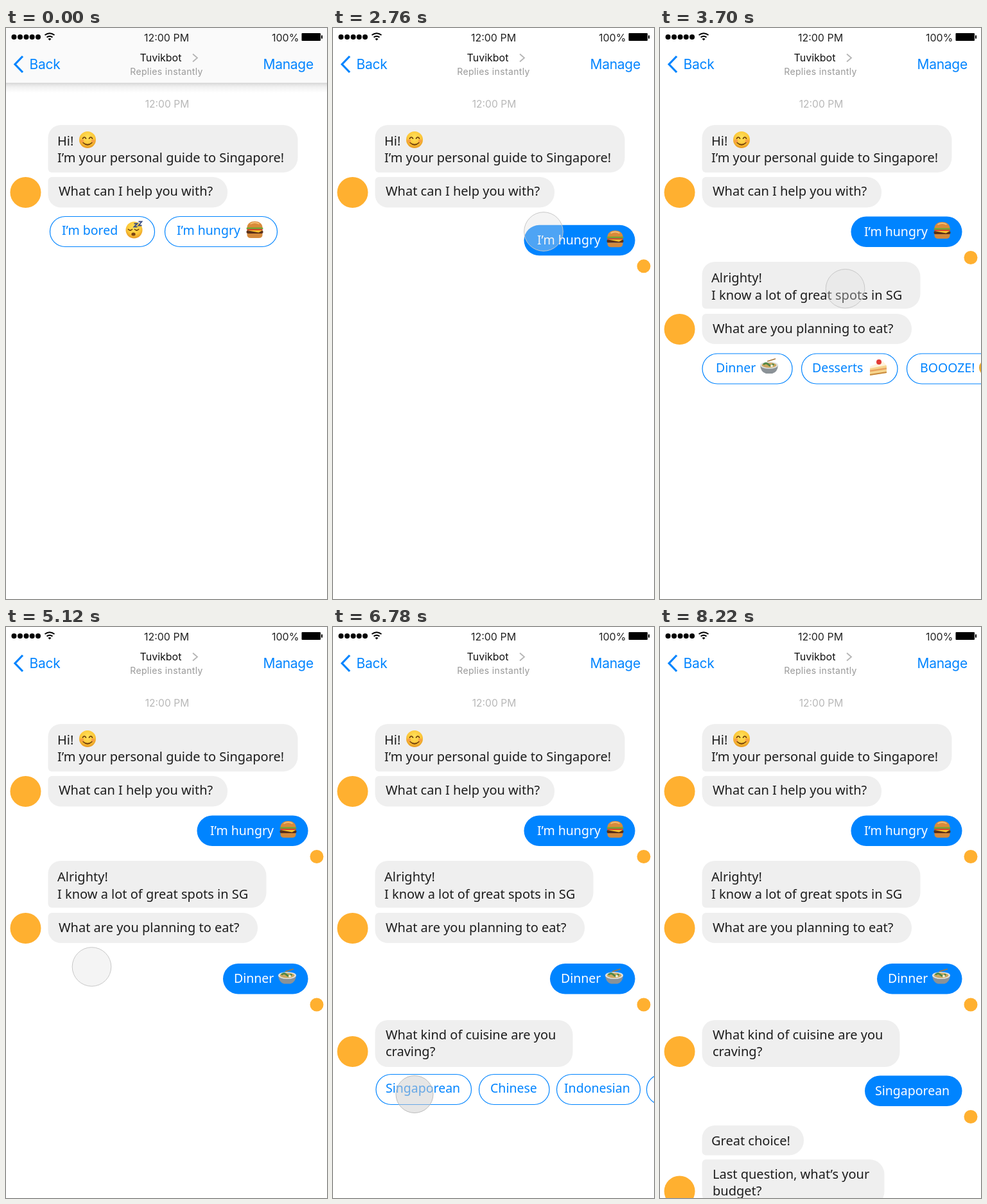
Write an HTML page that moves like this. It is 500x889 px and loops after 8.88 s.

```html
<!DOCTYPE html>
<html lang="en">
<head>
<meta charset="utf-8">
<title>Chat guide</title>
<style>
html, body { margin: 0; width: 100%; height: 100%; overflow: hidden; background: #fff; }
svg { display: block; width: 100%; height: 100%; }
text { font-family: "Noto Sans", sans-serif; font-size: 20px; fill: #1c1c1c; white-space: pre; }
.ui { font-family: Inter, sans-serif; }
.link { fill: #0084ff; font-size: 19.5px; }
.sent { fill: #fff; font-size: 19.5px; }
</style>
</head>
<body>
<svg id="stage" viewBox="0 0 500 889" xmlns="http://www.w3.org/2000/svg">
  <defs>
    <linearGradient id="shade" x1="0" y1="0" x2="0" y2="1">
      <stop offset="0" stop-color="#dcdcdc"/><stop offset=".4" stop-color="#f2f2f2"/><stop offset="1" stop-color="#fff"/>
    </linearGradient>
    <radialGradient id="face" cx=".5" cy=".35" r=".7">
      <stop offset="0" stop-color="#ffe25c"/><stop offset=".6" stop-color="#fcc738"/><stop offset="1" stop-color="#e08a1c"/>
    </radialGradient>
    <g id="smile">
      <circle r="13" fill="url(#face)"/>
      <g fill="none" stroke="#6b3b0c" stroke-width="1.7" stroke-linecap="round">
        <path d="M-7.5-2q2.5-4 5 0M2.5-2q2.5-4 5 0M-7 4.500q7 6.500 14 0"/>
      </g>
      <g fill="#f58a4a" opacity=".6"><circle cx="-8.500" cy="2" r="2.800"/><circle cx="8.500" cy="2" r="2.800"/></g>
    </g>
    <g id="sleepy">
      <circle r="13" fill="url(#face)"/>
      <path d="M-9-1q3 3 6 0M1-1q3 3 6 0" fill="none" stroke="#6b3b0c" stroke-width="1.700" stroke-linecap="round"/>
      <ellipse cx="-1" cy="6.500" rx="3.200" ry="2.500" fill="#7a4312"/>
      <path d="M0-10h5l-5 5h5M7-13h5l-5 6h5" fill="none" stroke="#3b4f86" stroke-width="1.800"/>
    </g>
    <g id="burger">
      <path d="M-12-3C-12-10-6-13 0-13S12-10 12-3z" fill="#d98a3a"/>
      <path d="M-7-9q7-4 14 0" fill="none" stroke="#f3bd74" stroke-width="2"/>
      <rect x="-13" y="-3.500" width="26" height="3" rx="1.500" fill="#6fa536"/>
      <rect x="-12" y="-1" width="24" height="2.500" fill="#d9432f"/>
      <rect x="-13" y="1" width="26" height="5" rx="2.500" fill="#5b3018"/>
      <path d="M-12 1h24l-6 3.500z" fill="#fbc02d"/>
      <path d="M-12 6h24v2q0 5-6 5h-12q-6 0-6-5z" fill="#d4893c"/>
    </g>
    <g id="soup">
      <path d="M-3-8L10-12" stroke="#a8773c" stroke-width="1.500"/>
      <path d="M-14-2q1 11 9 13h10q8-2 9-13z" fill="#8b9297"/>
      <ellipse cy="-2" rx="14" ry="5.500" fill="#dfe3e2"/>
      <ellipse cy="-2" rx="11.500" ry="4" fill="#cda760"/>
      <path d="M-9-3q4-4 8 0t8-1" fill="none" stroke="#4f8744" stroke-width="3"/>
      <circle cx="4" cy="-1" r="2" fill="#f5efd9"/>
    </g>
    <g id="cake">
      <path d="M-13-1L7-9l6 6v11l-26 4z" fill="#f6d58d"/>
      <path d="M-13-2L7-10l6 6-26 5z" fill="#fff3dc"/>
      <path d="M-13 5l26-4" stroke="#e9a15e" stroke-width="2.500"/>
      <path d="M-13 11l26-4" stroke="#c98a3d" stroke-width="2"/>
      <circle cx="1" cy="-9" r="4" fill="#e23b35"/>
    </g>
  </defs>
  <g id="chat"></g>
  <g id="header">
    <g id="bar">
      <rect width="500" height="86" fill="#fafafa"/>
      <rect y="86" width="500" height="15" fill="url(#shade)"/>
      <path d="M0 86h500" stroke="#cfcfcf"/>
    </g>
    <g><circle cx="12.500" cy="14" r="4"/><circle cx="22" cy="14" r="4"/><circle cx="31.500" cy="14" r="4"/><circle cx="40.700" cy="14" r="4"/><circle cx="50" cy="14" r="4"/></g>
    <path d="M60.500 11q7.500-5.500 15 0M63.500 14.500q4.500-3.500 9 0" fill="none" stroke="#000" stroke-width="2"/>
    <path d="M65.500 17q2.500-2 5 0l-2.500 2.500z"/>
    <rect x="460.500" y="8" width="29.500" height="12" rx="1"/><rect x="491" y="11.500" width="2" height="5"/>
    <path d="M26 44L14 56.500 26 69" fill="none" stroke="#0084ff" stroke-width="3.200"/>
    <path d="M291 40.500l7 6-7 6" fill="none" stroke="#b4b4b4" stroke-width="1.700"/>
  </g>
  <circle id="touch" r="30.500"/>
</svg>
<script>
const LOOP = 8880;
const $ = id => document.getElementById(id);

const label = (x, y, str, cls = '', extra = '') =>
  `<text x="${x}" y="${y}" class="${cls}" ${extra}>${str}</text>`;
const ui = (x, y, size, str, color, anchor = 'middle', gap = 0) =>
  label(x, y, str, 'ui', `text-anchor="${anchor}" style="font-size:${size}px;fill:${color};letter-spacing:${gap}px"`);
const emoji = (name, x, y) => `<use href="#${name}" x="${x}" y="${y}"/>`;
const avatar = (y, x = 30.5, r = 24) => `<circle cx="${x}" cy="${y}" r="${r}" fill="#ffb030"/>`;

// Grey bubble; tl and bl are the left corner radii.
function bubble(y, right, height, tl, bl, lines) {
  const x = 65.5, r = Math.min(23, height / 2), w = right - x;
  const shape = `M${x + tl} ${y}h${w - tl - r}a${r} ${r} 0 0 1 ${r} ${r}v${height - 2 * r}` +
    `a${r} ${r} 0 0 1 ${-r} ${r}h${-(w - r - bl)}a${bl} ${bl} 0 0 1 ${-bl} ${-bl}` +
    `v${-(height - tl - bl)}a${tl} ${tl} 0 0 1 ${tl} ${-tl}z`;
  return `<path d="${shape}" fill="#efefef"/>` + lines.map(l => label(...l)).join('');
}
const chip = (x, right, y, textX, str) =>
  `<rect x="${x}" y="${y}" width="${right - x}" height="47" rx="23.5" fill="#fff" stroke="#0084ff" stroke-width="1.2"/>` +
  label(textX, y + 28.7, str, 'link');
const sent = (x, y, textX, str) =>
  `<rect x="${x}" y="${y}" width="${470.5 - x}" height="47.5" rx="23.7" fill="#0084ff"/>` +
  label(textX, y + 30, str, 'sent') + avatar(y + 64, 484, 10.5);

const outQuad = p => 1 - (1 - p) ** 2;
const outCubic = p => 1 - (1 - p) ** 3;
const inQuad = p => p * p;
const inOut = p => p < .5 ? 4 * p ** 3 : 1 - 4 * (1 - p) ** 3;
const progress = (t, a, b) => Math.min(1, Math.max(0, (t - a) / (b - a)));

// Each part: markup, entry [start, end, dx, dy], time it leaves.
const parts = [
  { html: bubble(151, 454.5, 74, 20, 6, [[80, 183, 'Hi!'], [80, 209, 'I’m your personal guide to Singapore!']]) +
      emoji('smile', 127, 174) + bubble(232, 345, 47.5, 6, 20, [[82, 261, 'What can I help you with?']]) + avatar(256) },
  { html: chip(68.5, 231.5, 293.5, 87, 'I’m bored') + emoji('sleepy', 199.5, 314.5) +
      chip(247.5, 422.5, 293.5, 266, 'I’m hungry') + emoji('burger', 387.5, 314), leave: 2220 },
  { html: sent(297.5, 293.5, 318, 'I’m hungry') + emoji('burger', 439.5, 315), enter: [2380, 3000, 0, 90] },
  { html: bubble(364, 405.5, 73, 20, 6, [[80, 396, 'Alrighty!'], [80, 422.5, 'I know a lot of great spots in SG']]) +
      bubble(445, 392, 47, 6, 20, [[82, 474.5, 'What are you planning to eat?']]) + avatar(469), enter: [2900, 3300, -460, 0] },
  { html: chip(66, 206, 507, 87, 'Dinner') + emoji('soup', 170, 527) +
      chip(220.5, 370, 507, 237, 'Desserts') + emoji('cake', 340, 529) +
      chip(384.5, 560, 507, 405, 'BOOOZE!') + '<circle cx="510" cy="529" r="13" fill="#e8a92c"/>',
    enter: [3160, 3600, 0, 385], leave: 4640 },
  { html: sent(338, 524, 355, 'Dinner') + emoji('soup', 438, 544.5), enter: [4640, 5100, 0, 80] },
  { html: bubble(612, 373.5, 73, 20, 20, [[82, 641.5, 'What kind of cuisine are you'], [82, 668, 'craving?']]) +
      avatar(661), enter: [5200, 5560, -430, 0] },
  { html: chip(67, 215.5, 696.5, 82, 'Singaporean') + chip(227.5, 337, 696.5, 245, 'Chinese') +
      chip(348.5, 478.5, 696.5, 360, 'Indonesian') + chip(488.5, 600, 696.5, 510, 'Indian'),
    enter: [5420, 5840, 0, 195], leave: 6900 },
  { html: sent(319, 698.5, 335, 'Singaporean'), enter: [7020, 7520, 0, 80] },
  { html: bubble(776, 224, 46.5, 20, 6, [[80, 807, 'Great choice!']]) +
      bubble(829, 349.5, 73, 6, 20, [[82, 859, 'Last question, what’s your'], [82, 885, 'budget?']]) +
      avatar(878.5), enter: [7540, 7960, -420, 0] }
];

$('chat').innerHTML = ui(251, 124, 15.6, '12:00 PM', '#b8b8b8') +
  parts.map(p => `<g>${p.html}</g>`).join('');
const groups = $('chat').querySelectorAll(':scope > g');

$('header').insertAdjacentHTML('beforeend',
  ui(250, 20.5, 16, '12:00 PM', '#222') + ui(414, 20.5, 16, '100%', '#222', 'start') +
  ui(241, 52, 16, 'Tuvikbot', '#111') + ui(250, 73, 14, 'Replies instantly', '#999', 'middle', .35) +
  ui(36.5, 64, 21, 'Back', '#0084ff', 'start', -.25) + ui(479, 64, 21, 'Manage', '#0084ff', 'end', -.25));

// start, end, easing, from, control, to
const moves = [
  [360, 780, outQuad, [374, -31], [410, 130], [428, 273]],
  [940, 1560, inOut, [428, 273], [355, 343], [328, 317]],
  [3200, 4360, inOut, [328, 317], [284, 470], [133.5, 529]],
  [6100, 6740, inOut, [133.5, 529], [130, 628], [127, 727.5]],
  [7160, 7900, inOut, [127, 727.5], [250, 560], [335.5, 314.5]],
  [8100, 8220, inQuad, [335.5, 314.5], [365, 140], [385, -32]]
];
const presses = [[2080, 2220], [4520, 4640], [6780, 6900]];

function drawTouch(t) {
  const [start, end, ease, a, c, b] = moves.filter(m => t >= m[0]).pop() || moves[0];
  const s = ease(progress(t, start, end));
  const at = i => (1 - s) ** 2 * a[i] + 2 * s * (1 - s) * c[i] + s * s * b[i];
  const down = presses.some(([from, to]) => t >= from && t < to);
  const touch = $('touch');
  touch.setAttribute('cx', at(0));
  touch.setAttribute('cy', at(1));
  touch.setAttribute('r', down ? 29 : 30.3);
  touch.setAttribute('fill', down ? 'rgba(205,205,205,.5)' : 'rgba(224,224,224,.35)');
  touch.setAttribute('stroke', down ? '#bdbdbd' : '#c8c8c8');
}

function drawPart(part, group, t) {
  let x = 0, y = 0, alpha = 1;
  if (part.enter) {
    const [start, end, dx, dy] = part.enter;
    const rising = dy > 0 && dy < 100;
    const rest = 1 - (rising ? outQuad : outCubic)(progress(t, start, end));
    x = dx * rest;
    y = dy * rest;
    alpha = t < start ? 0 : rising ? progress(t, start, start + 120) : 1;
  }
  if (part.leave) {
    const out = progress(t, part.leave, part.leave + 280);
    x -= 520 * inQuad(out);
    if (out === 1) alpha = 0;
  }
  group.setAttribute('transform', `translate(${x} ${y})`);
  group.setAttribute('opacity', alpha);
}

function frame() {
  const t = performance.now() % LOOP;
  parts.forEach((part, i) => drawPart(part, groups[i], t));
  $('bar').setAttribute('opacity', t < 2220 ? 1 : 0);
  drawTouch(t);
  requestAnimationFrame(frame);
}
frame();
</script>
</body>
</html>
```
